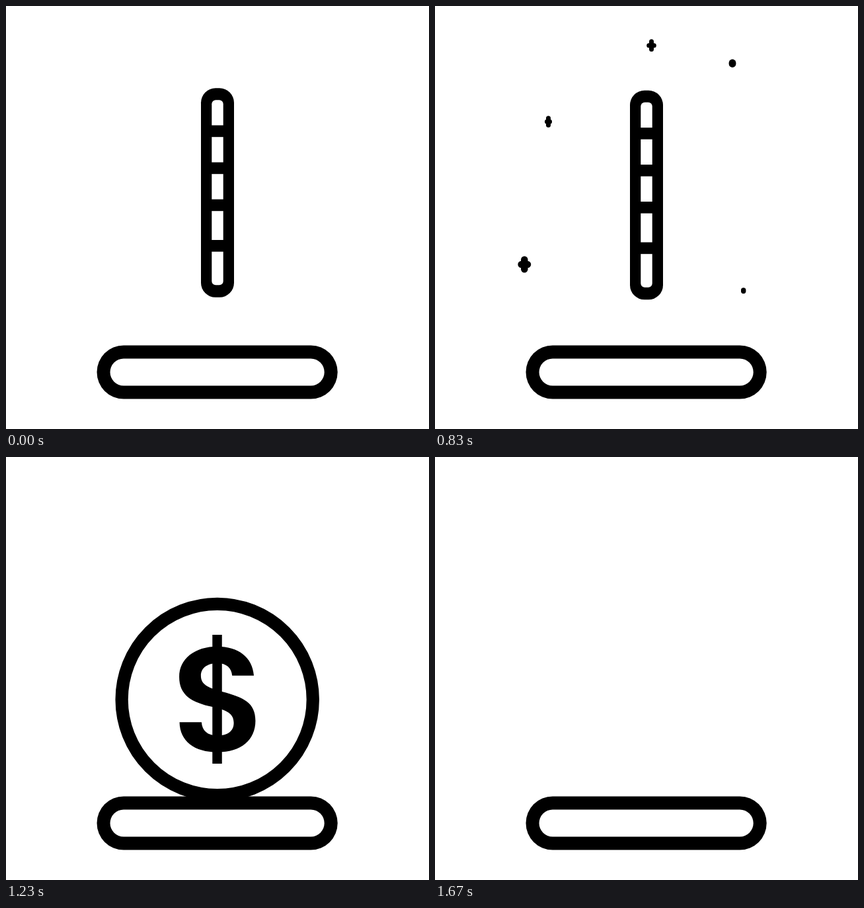
These frames come from a looping animation (640x640 px, 1.86 s). An HTML page with a canvas:

```html
<!DOCTYPE html>
<html lang="en">
<head>
<meta charset="utf-8">
<title>Coin and slot</title>
<style>
  html, body { margin: 0; width: 100%; height: 100%; overflow: hidden; background: #fff; }
  canvas { display: block; }
</style>
</head>
<body>
<canvas id="stage" width="640" height="640"></canvas>
<script>
const ctx = document.getElementById('stage').getContext('2d');
const LOOP = 1860, STEP = 1000 / 30;
const CX = 319.7, CY = 283.5, SLOT_FLOOR = 575;

const clamp = v => Math.max(0, Math.min(1, v));
const span = (t, from, to) => clamp((t - from) / (to - from));
const sine = u => (1 - Math.cos(Math.PI * u)) / 2;

const letterS = new Path2D(
  'M377 246C375 217 352 200.5 320 200.5C284 200.5 260 220 260 248' +
  'C260 277 280 288 312 295C335 300 345.5 306 345.5 320' +
  'C345.5 333 336 340 320 340C304 340 296 332 295 319L260.5 319' +
  'C261 349 284 366 320 366C357 366 379.5 347 379.5 317' +
  'C379.5 288 361 280 327 271C305 265 294 260 294 246' +
  'C294 234 304 226.5 320 226.5C334 226.5 342 234 343 246Z');

function roundBox(x, y, w, h, r, color) {
  ctx.beginPath();
  ctx.roundRect(x, y, w, h, r);
  ctx.fillStyle = color;
  ctx.fill();
}

function line(x1, y1, x2, y2, width) {
  ctx.lineWidth = width;
  ctx.beginPath();
  ctx.moveTo(x1, y1);
  ctx.lineTo(x2, y2);
  ctx.stroke();
}

function drawSlot() {
  roundBox(137.5, 513.5, 364.2, 81, 40.5, '#000');
  roundBox(157.5, 533.5, 324.2, 41, 20.5, '#fff');
}

function drawFace() {
  ctx.beginPath();
  ctx.arc(CX, CY, 149.8, 0, Math.PI * 2);
  ctx.fillStyle = '#fff';
  ctx.fill();
  ctx.lineWidth = 20;
  ctx.stroke();
  ctx.fillStyle = '#000';
  ctx.fill(letterS);
  ctx.fillRect(312, 182, 15, 202);
}

function drawEdge() {
  roundBox(295, 124.3, 50, 316.5, 22, '#000');
  roundBox(311.3, 142.3, 17.4, 280, 6, '#fff');
  ctx.fillStyle = '#000';
  for (const y of [180.5, 236.5, 292.5, 354]) ctx.fillRect(305, y, 30, 17.7);
}

function coinPose(t) {
  if (t < 130) return 'edge';
  if (t < 230) return 'turn';
  if (t < 730) return 'face';
  if (t < 795) return 'turn';
  if (t < 895) return 'edge';
  if (t < 995) return 'turn';
  return 'face';
}

// small hop, short rest, then an accelerating drop
function coinShift(t) {
  const hop = span(t, 567, 833), drop = span(t, 967, 1633.4);
  return 3.5 * hop - 17.5 * Math.sin(Math.PI * hop) ** 2 + 424.5 * drop ** 1.82;
}

function drawCoin(t) {
  if (t > 1650) return;
  const pose = coinPose(t);
  const size = 1 - 0.1145 * span(t, 967, 1633.4) ** 1.3;
  ctx.save();
  ctx.beginPath();
  ctx.rect(0, 0, 640, SLOT_FLOOR);
  ctx.clip();
  ctx.translate(CX, CY + coinShift(t));
  ctx.scale(size * (pose === 'turn' ? 0.6 : 1), size);
  ctx.translate(-CX, -CY);
  if (pose === 'edge') drawEdge(); else drawFace();
  ctx.restore();
}

// falling streak whose head leaves first and whose tail catches up
function drawStreak(t, x, y, width) {
  if (t < 800 || t > 1160) return;
  const head = y + 69 * sine(span(t, 800, 1150));
  const tail = y + 69 * sine(span(t, 845, 1180));
  line(x, tail, x, head, width);
}

function drawSpark(t, x, y, w, h, width, start, peak, end) {
  if (t < start || t >= end) return;
  const k = t < peak ? sine(span(t, start, peak)) : 1 - sine(span(t, peak, end));
  line(x - w * k, y, x + w * k, y, width);
  line(x, y - h * k, x, y + h * k, width);
}

function drawSparkles(t) {
  ctx.lineCap = 'round';
  drawSpark(t, 327.5, 59.7, 15, 23.3, 7, 783, 933, 1065);
  drawSpark(t, 171.5, 175, 8, 21, 7, 783, 933, 1065);
  drawSpark(t, 135.3, 391, 8, 12.5, 10.5, 750, 900, 1120);
  drawStreak(t, 450, 86, 10.8);
  drawStreak(t, 466.7, 430, 7.4);
}

function draw(t) {
  ctx.fillStyle = '#fff';
  ctx.fillRect(0, 0, 640, 640);
  ctx.strokeStyle = '#000';
  drawSlot();
  drawSparkles(t);
  drawCoin(t);
}

const begin = performance.now();
function tick() {
  const t = Math.max(0, performance.now() - begin) % LOOP;
  draw(Math.floor((t + 3.4) / STEP) * STEP);
  requestAnimationFrame(tick);
}
tick();
</script>
</body>
</html>
```
